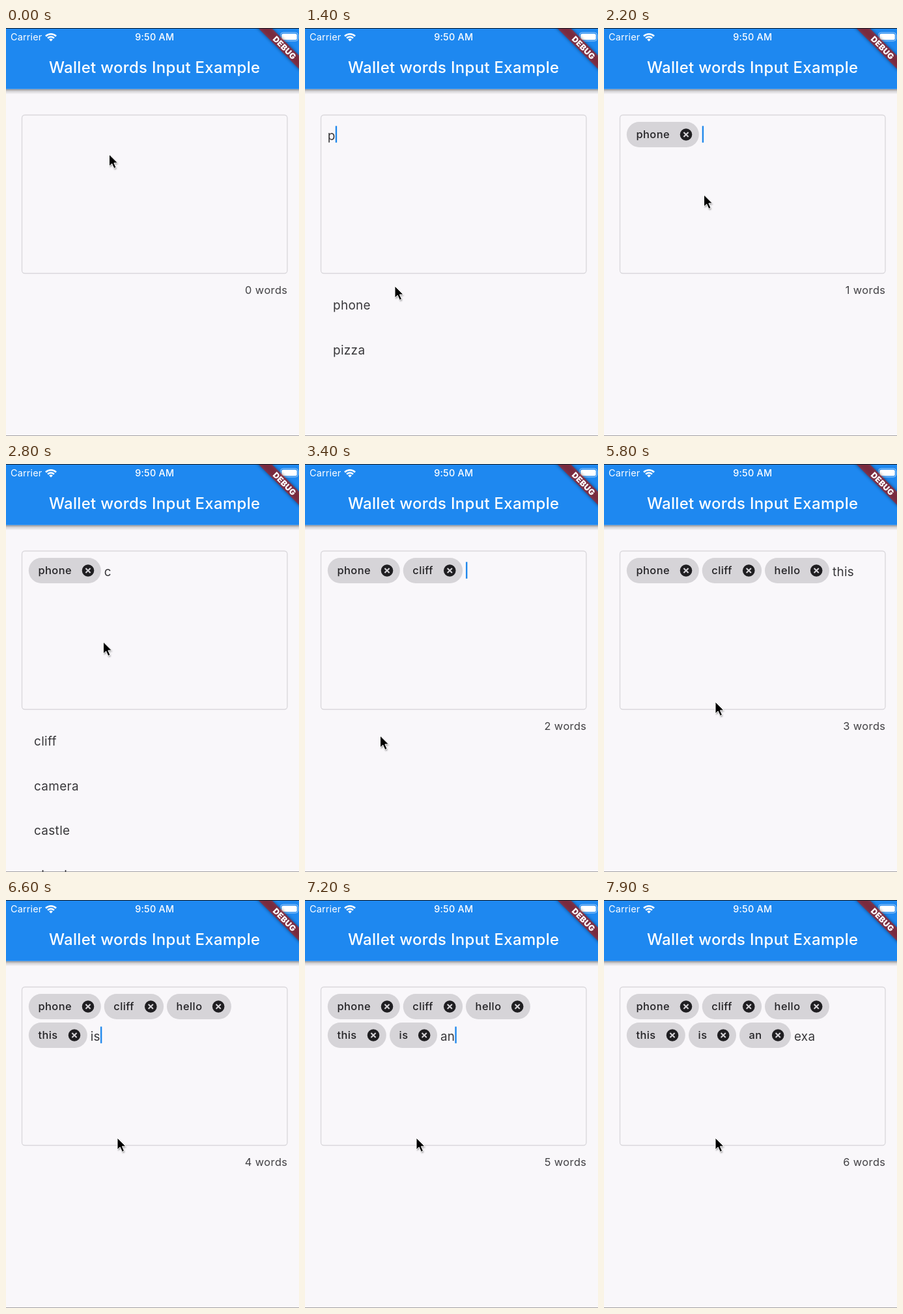
These frames come from a looping animation (450 by 626 pixels, 8000 ms). An HTML page:

```html
<!DOCTYPE html>
<html lang="en">
<head>
<meta charset="utf-8">
<title>Word input</title>
<style>
  html, body { margin: 0; height: 100%; overflow: hidden; background: #f9f7fa; }
  svg { display: block; width: 450px; height: 626px; font-family: Inter, Roboto, sans-serif; }
  text { white-space: pre; }
  .bar { fill: #fff; }
  .body { font-size: 18.9px; fill: #38373a; letter-spacing: .35px; }
  .chip { font-size: 16.4px; font-weight: 500; fill: #232225; letter-spacing: .45px; }
  .count { font-size: 16.4px; fill: #424144; letter-spacing: .4px; }
</style>
</head>
<body>
<svg viewBox="0 0 450 626">
  <defs>
    <linearGradient id="shade" x2="0" y2="1">
      <stop offset="0" stop-opacity=".42"/>
      <stop offset=".4" stop-opacity=".15"/>
      <stop offset="1" stop-opacity="0"/>
    </linearGradient>
    <filter id="blur" x="-30%" y="-100%" width="160%" height="300%"><feGaussianBlur stdDeviation="2.6"/></filter>
    <filter id="soft" x="-50%" y="-50%" width="200%" height="200%"><feGaussianBlur stdDeviation="1.2"/></filter>
  </defs>
  <rect width="450" height="626" fill="#f9f7fa"/>
  <rect y="93.7" width="450" height="8" fill="url(#shade)"/>
  <rect width="450" height="93.7" fill="#1e88f0"/>

  <g class="bar">
    <text x="7" y="19" font-size="14.5" letter-spacing=".12">Carrier</text>
    <text x="228.3" y="19" font-size="14.4" font-weight="550" text-anchor="middle" letter-spacing=".25">9:50 AM</text>
    <text x="228.2" y="68.8" font-size="24" font-weight="530" text-anchor="middle" letter-spacing=".3">Wallet words Input Example</text>
    <g transform="translate(69 20.5)">
      <path d="M0 0L-2.8 -2.8A4 4 0 0 1 2.8 -2.8Z"/>
      <path d="M-4.9 -4.9A6.9 6.9 0 0 1 4.9 -4.9M-8 -8A11.3 11.3 0 0 1 8 -8" fill="none" stroke="#fff" stroke-width="2.6"/>
    </g>
    <rect x="421.5" y="7" width="27" height="13" rx="4" fill="none" stroke="#fff" stroke-opacity=".55"/>
    <rect x="423.2" y="8.7" width="23.6" height="9.6" rx="2.6"/>
  </g>

  <g transform="translate(456 1.5) rotate(45)">
    <rect x="-60" y="33" width="120" height="14.6" opacity=".5" filter="url(#blur)"/>
    <rect x="-60" y="33" width="120" height="14.6" fill="#b71c1c" fill-opacity=".627"/>
    <text x=".5" y="44.8" fill="#fff" font-size="12.4" font-weight="900" text-anchor="middle" letter-spacing=".3">DEBUG</text>
  </g>

  <rect width="450" height="1" fill="#111a24"/>
  <rect y="625" width="450" height="1" fill="#a3a2a5"/>
  <rect x="24.5" y="133.5" width="407.5" height="243" rx="4.5" fill="none" stroke="#d9d7db" stroke-width="1.3"/>

  <g id="chips"></g>
  <text id="typed" class="body"></text>
  <rect id="caret" width="2.4" height="25.5" fill="#2189ec"/>
  <text id="count" class="count" x="432.4" y="407.5" text-anchor="end"></text>
  <g id="list"></g>

  <g id="mouse">
    <path d="M0 0V18L4.2 14.2L7.4 21.4L10.5 20L7.4 13H13Z" transform="translate(1 2)" opacity=".35" filter="url(#soft)"/>
    <path d="M0 0V18L4.2 14.2L7.4 21.4L10.5 20L7.4 13H13Z" stroke="#fff"/>
  </g>
</svg>
<script>
const LOOP = 8000;
const byId = id => document.getElementById(id);

const dictionary = ['phone', 'pizza', 'cliff', 'camera', 'castle', 'cloud', 'hello',
  'table', 'ticket', 'idea', 'ink', 'arrow', 'actor', 'apply'];

// word, left edge, row, width
const chips = [
  ['phone', 34.8, 0, 111], ['cliff', 150.7, 0, 91.4], ['hello', 247, 0, 99],
  ['this', 34.8, 1, 90], ['is', 130, 1, 73], ['an', 208, 1, 79]
];

// start time, finished words, text being typed
const steps = [
  [0, 0, ''], [300, 0, 'p'], [1900, 1, ''], [2600, 1, 'c'], [3300, 2, ''],
  [4600, 2, 'h'], [4700, 2, 'he'], [4800, 2, 'hel'], [4900, 2, 'hell'], [5000, 2, 'hello'], [5300, 3, ''],
  [5500, 3, 't'], [5600, 3, 'th'], [5700, 3, 'thi'], [5800, 3, 'this'], [6100, 4, ''],
  [6300, 4, 'i'], [6600, 4, 'is'], [6800, 5, ''],
  [7000, 5, 'a'], [7200, 5, 'an'], [7400, 6, ''], [7600, 6, 'e'], [7800, 6, 'ex'], [7900, 6, 'exa']
];

// time, x, y of the pointer tip
const mousePath = [
  [0, 158.5, 194], [1000, 158.5, 194], [1400, 138, 396], [1700, 126, 417], [1900, 126, 417],
  [2200, 153.5, 256], [2700, 153.5, 256], [3200, 115.5, 417], [3400, 115.5, 417], [3600, 113, 412],
  [4600, 113, 412], [5000, 171, 365], [LOOP, 171, 365]
];

const chipMarkup = ([word, x, row, width]) => `
  <g transform="translate(${x} ${144 + row * 44})">
    <rect width="${width}" height="38.9" rx="19.45" fill="#d6d4d8"/>
    <text class="chip" x="14.6" y="24.8">${word}</text>
    <g transform="translate(${width - 19.8} 19.5)">
      <circle r="9.3" fill="#1f1e21"/>
      <path d="M-3.6 -3.6L3.6 3.6M3.6 -3.6L-3.6 3.6" stroke="#d6d4d8" stroke-width="2.1"/>
    </g>
  </g>`;

let shown;

function showStep(step) {
  if (step === shown) return;
  shown = step;
  const [, done, text] = step;
  const [, x, row, width] = done ? chips[done - 1] : ['', 34.8, 0, -4.9];
  const left = x + width + 4.9;
  const matches = text ? dictionary.filter(word => word.startsWith(text)) : [];

  byId('chips').innerHTML = chips.slice(0, done).map(chipMarkup).join('');
  byId('list').innerHTML = matches.map((word, i) =>
    `<text class="body" x="43" y="${432.3 + i * 68.2}">${word}</text>`).join('');
  byId('count').textContent = matches.length ? '' : `${done} words`;

  const typed = byId('typed');
  typed.textContent = text;
  typed.setAttribute('x', left);
  typed.setAttribute('y', 171.5 + row * 44);
  byId('caret').setAttribute('x', left + (text ? typed.getComputedTextLength() : 0));
  byId('caret').setAttribute('y', 150.3 + row * 44);
}

function mouseAt(t) {
  const i = mousePath.findIndex(point => point[0] > t);
  const [t0, x0, y0] = mousePath[i - 1];
  const [t1, x1, y1] = mousePath[i];
  const p = (t - t0) / (t1 - t0);
  const ease = p * p * (3 - 2 * p);
  return [x0 + (x1 - x0) * ease, y0 + (y1 - y0) * ease];
}

function draw() {
  const t = performance.now() % LOOP;
  showStep(steps.findLast(step => step[0] <= t));
  const caretOn = Math.floor((t + 800) / 500) % 2 === 0;
  byId('caret').setAttribute('opacity', caretOn ? 1 : 0);
  byId('mouse').setAttribute('transform', `translate(${mouseAt(t)})`);
  requestAnimationFrame(draw);
}
draw();
</script>
</body>
</html>
```
